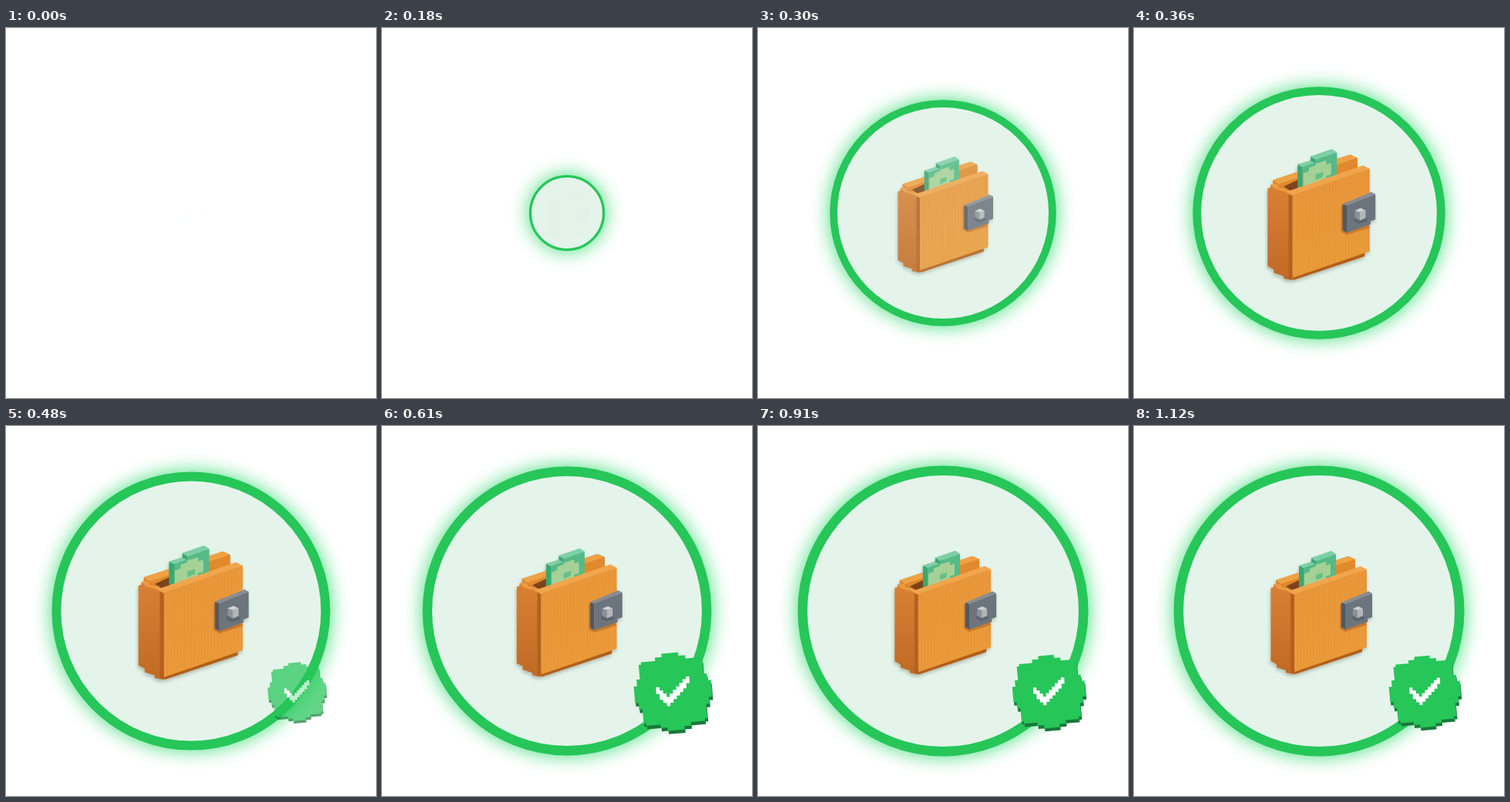
Write an HTML page that moves like this. It is 480x480 px and loops after 2030 ms.

```html
<!DOCTYPE html>
<html lang="en">
<head>
<meta charset="utf-8">
<title>Wallet verified</title>
<style>
  html, body { margin: 0; width: 100%; height: 100%; overflow: hidden; background: #fff; }
  svg { display: block; width: 480px; height: 480px; }
  #glow { fill: #4ade80; filter: blur(12.5px); }
  #ring { fill: #e4f4ea; stroke: #26c659; }
  #wallet { filter: drop-shadow(-1px 3px 2px rgba(40, 30, 20, .25)); }
</style>
</head>
<body>
<svg viewBox="0 0 480 480">
  <defs>
    <linearGradient id="side" x2="0" y2="1">
      <stop stop-color="#d98033"/><stop offset="1" stop-color="#c06a25"/>
    </linearGradient>
    <linearGradient id="front" x2=".3" y2="1">
      <stop stop-color="#e8963a"/><stop offset="1" stop-color="#eb9b39"/>
    </linearGradient>
    <pattern id="grain" width="4" height="4" patternUnits="userSpaceOnUse">
      <path d="M0 0h1v4h-1z" fill="#b86414" opacity=".1"/>
    </pattern>
  </defs>
  <circle id="glow" cx="240" cy="240"/>
  <circle id="ring" cx="240" cy="240"/>

  <g id="wallet">
    <!-- back panel and opening -->
    <path fill="#dd852a" d="M184 206V200L278 169L287 173V192L206 216Z"/>
    <path fill="#f0a145" d="M184 200L278 169L287 173L191 205Z"/>
    <path fill="#e08a2d" d="M191 205L287 173V190L206 214Z"/>
    <path fill="#7d431b" d="M197 208L216 199V212L207 214Z"/>
    <!-- banknotes -->
    <path fill="#39a872" d="M214 181L220 184V211L214 209Z"/>
    <path fill="#55ba87" d="M220 184L236 178V175L262 166V199L220 210Z"/>
    <path fill="#7ed0a6" d="M214 181L230 176L236 178L220 184Z"/>
    <path fill="#39a872" d="M230 171L236 175V179L230 177Z"/>
    <path fill="#7bd0a5" d="M230 171L256 162L262 166L236 175Z"/>
    <path fill="#a5d196" d="M221 192L228 189V185L236 182V180L249 176V181L255 179V193L249 195V200L221 209Z"/>
    <path fill="#66bf83" d="M236 193L245 190V196L236 200Z"/>
    <!-- left side -->
    <path fill="url(#side)" d="M177.500 210L181 209V206L185 205L207 215V322L197 320V317L185 313V309L177.500 305Z"/>
    <path fill="#ec9b42" d="M181 206L185 204L191 206V209L200 211L207 214L213 214L207 219L198 214L187 211Z"/>
    <path fill="#b6601d" d="M203 217L208 219V322L203 320Z"/>
    <!-- front panel -->
    <path fill="#b25f19" d="M206 316L296 286V293L209 322Z"/>
    <path fill="url(#front)" d="M208 217L302 186V287L208 319Z"/>
    <path fill="url(#grain)" d="M208 217L302 186V287L208 319Z"/>
    <path fill="#f1a54d" d="M201 214L294 182L302 186L208 218Z"/>
    <!-- clasp -->
    <path fill="#a65c20" opacity=".5" d="M267 232L270 229V261L300 254L302 258L274 267L267 263Z"/>
    <path fill="#515860" d="M269 229L274 231V264L269 261Z"/>
    <path fill="#6c747d" d="M274 231L309 217V248L303 250V254L274 264Z"/>
    <path fill="#858d95" d="M269 229L303 215L303 214L309 217L274 231Z"/>
    <path fill="#4f565e" opacity=".6" d="M283 246L290 250L299 247V250L289 253L283 250Z"/>
    <path fill="#8b9195" d="M284 237L290 239V249L284 246Z"/>
    <path fill="#b3b7ba" d="M290 239L297 237V246L290 249Z"/>
    <path fill="#d0d3d5" d="M284 237L291 234L297 237L290 239Z"/>
  </g>

  <g id="badge"></g>
</svg>
<script>
const LOOP = 2030, RADIUS = 188.5, BORDER = 12.5;
const el = id => document.getElementById(id);

// Badge: stepped seal made of overlapping blocks, plus a check of short columns
const block = (w, h) => `M${-w} ${-h}h${2 * w}v${2 * h}h${-2 * w}z`;
const seal = [[10, 46], [18, 42], [35, 38]].map(([a, b]) => block(a, b) + block(b, a)).join('');
let check = '';
for (let i = 0; i < 10; i++) {
  const top = i < 4 ? -6 + 4 * i : 18 - 4 * i;
  const end = i === 0 || i === 9;
  check += `M${-20 + 4 * i} ${top + (i === 9 ? 1 : 0)}h4.200v${end ? 8 : 11}h-4.200z`;
}
el('badge').innerHTML = `
  <path d="${seal}" fill="#17793a" transform="translate(1 4) rotate(-5)"/>
  <path d="${seal}" fill="#26c659" transform="rotate(-5)"/>
  <path d="${check}" fill="#fff" transform="rotate(-3)"/>`;

const clamp = x => Math.min(1, Math.max(0, x));

// Cubic Bezier easing with y1 = 0, y2 = 1
function ease(x, x1, x2) {
  let lo = 0, hi = 1, s;
  for (let i = 0; i < 24; i++) {
    s = (lo + hi) / 2;
    const u = 1 - s;
    if (3 * s * u * u * x1 + 3 * s * s * u * x2 + s * s * s < x) lo = s; else hi = s;
  }
  return s * s * (3 - 2 * s);
}

// Pop with overshoot: [ms, scale] joined smoothly
const POP = [[180, .4], [240, .69], [270, .815], [300, .937], [360, 1.0625], [420, 1.095],
  [480, 1.0875], [600, 1.045], [760, 1.0125], [900, 1.003], [1080, 1]];
const slope = i => {
  const a = POP[Math.max(0, i - 1)], b = POP[Math.min(POP.length - 1, i + 1)];
  return (b[1] - a[1]) / (b[0] - a[0]);
};
function pop(t) {
  if (t <= POP[0][0]) return POP[0][1];
  const i = POP.findIndex(p => p[0] > t) - 1;
  if (i < 0) return 1;
  const [t0, a] = POP[i], [t1, b] = POP[i + 1], d = t1 - t0, s = (t - t0) / d, u = 1 - s;
  return a * u * u * (1 + 2 * s) + b * s * s * (3 - 2 * s)
    + d * s * u * (slope(i) * u - slope(i + 1) * s);
}
const fade = t => 1 - (1 - clamp((t - 180) / 196)) ** 2;

function place(node, t, transform) {
  node.setAttribute('transform', transform(pop(t)));
  node.setAttribute('opacity', fade(t));
}

function draw() {
  const t = performance.now() % LOOP;
  const k = ease(clamp((t + 57) / 758), .6, .044), r = RADIUS * k;
  el('glow').setAttribute('r', r + .5);
  el('ring').setAttribute('r', r - BORDER * k / 2);
  el('ring').setAttribute('stroke-width', BORDER * k);
  el('ring').setAttribute('opacity', clamp(k * 20));
  place(el('wallet'), t, s => `translate(243 242) scale(${s}) translate(-243 -242)`);
  place(el('badge'), t - 210, s => `translate(377.5 344.5) scale(${s})`);
  requestAnimationFrame(draw);
}
draw();
</script>
</body>
</html>
```
